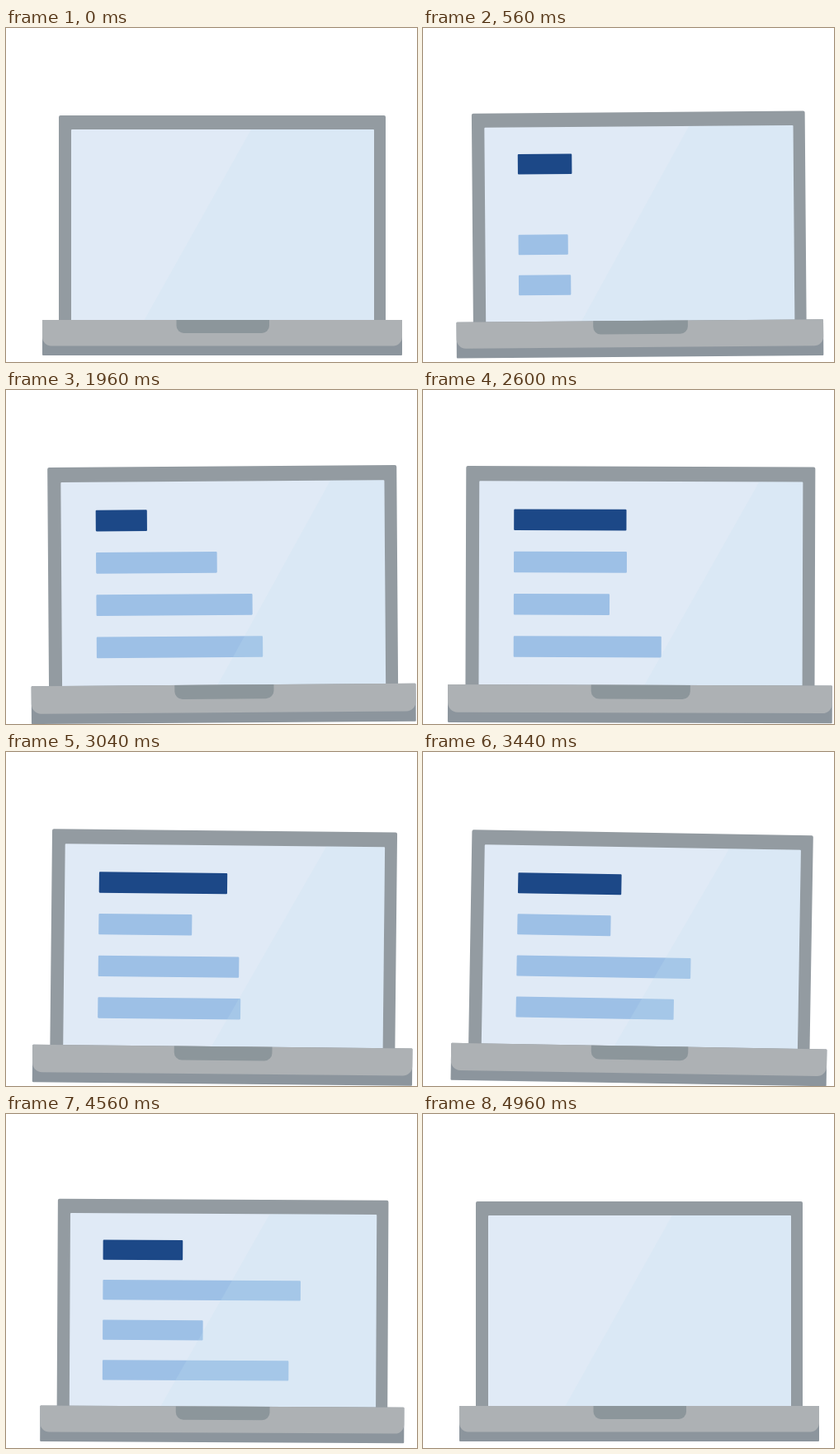
Animation of 498 by 405 pixels, one loop 5.08 s. Source, as an HTML page with a canvas:

```html
<!DOCTYPE html>
<html lang="en">
<head>
<meta charset="utf-8">
<title>Laptop</title>
<style>
  html, body { margin: 0; width: 100%; height: 100%; overflow: hidden; background: #fff; }
  canvas { display: block; }
</style>
</head>
<body>
<canvas id="stage" width="498" height="405"></canvas>
<script>
const ctx = document.getElementById('stage').getContext('2d');
const LOOP = 5.08, STEP = 0.04, LAST = 4.96; // seconds
const PIVOT = { x: 245, y: 301 };

// Rises from 0 to 1 at the peak, then falls back to 0 at the end.
const tent = (t, peak, end) => Math.min(t / peak, (end - t) / (end - peak));

const zoom = t => 1 + 0.0785 * tent(t, 2.25, LAST);
const glareX = t => 297 + 107.5 * tent(t, 2.4, LOOP);
const tilt = t => Math.max(-t / 1.24, Math.min((t - 2.4) / 1.09, (LAST - t) / 1.4));

// A bar drifts steadily while swinging around its drift; it grows in and shrinks out.
const fade = t => Math.min(1, t / 1.12, (LAST - t) / 0.4);
const swayingBar = (base, drift, swing, period, peak) => t =>
  fade(t) * Math.max(0, base + drift * t + swing * Math.cos(2 * Math.PI * (t - peak) / period));

const bars = [
  swayingBar(80, 8, 44, 2.4, 2.95),
  swayingBar(4, 44, 47, 3, 1.95),
  swayingBar(155, 0, 47, 1.8, 1.65),
  swayingBar(137, 16, 22, 2.4, 1.8)
];

function box(color, x, y, w, h, radii = 0) {
  ctx.fillStyle = color;
  ctx.beginPath();
  ctx.roundRect(x, y, w, h, radii);
  ctx.fill();
}

function drawScreen(t) {
  box('#939ba1', 64, 106, 396, 250, [2, 2, 0, 0]);
  box('#e0eaf6', 79, 123, 367, 232, [1, 1, 0, 0]);

  bars.forEach((widthAt, i) => {
    const w = widthAt(t);
    if (w > 0) box(i ? '#9dc0e6' : '#1c4887', 118.4, 154.8 + 48 * i, w, 24, Math.min(1, w / 2));
  });

  const edge = glareX(t);
  ctx.fillStyle = 'rgba(195, 225, 241, 0.2)';
  ctx.beginPath();
  ctx.moveTo(edge, 123);
  ctx.lineTo(446, 123);
  ctx.lineTo(446, 355);
  ctx.lineTo(edge - 130, 355);
  ctx.fill();
}

function drawBase() {
  box('#8c959d', 44, 354, 436, 43, 1);
  box('#adb1b4', 44, 354, 436, 31.5, [1, 1, 11, 11]);
  box('#8c969b', 206.5, 354, 112.5, 16, [0, 0, 9, 9]);
}

function draw(t) {
  ctx.fillStyle = '#fff';
  ctx.fillRect(0, 0, 498, 405);
  ctx.save();
  ctx.translate(PIVOT.x, PIVOT.y);
  ctx.rotate(tilt(t) * Math.PI / 180);
  ctx.scale(zoom(t), zoom(t));
  ctx.translate(-PIVOT.x, -PIVOT.y);
  drawScreen(t);
  drawBase();
  ctx.restore();
}

const start = performance.now();
function tick() {
  const t = (performance.now() - start) / 1000 % LOOP;
  draw(Math.min(LAST, Math.floor(t / STEP) * STEP));
  requestAnimationFrame(tick);
}
tick();
</script>
</body>
</html>
```
